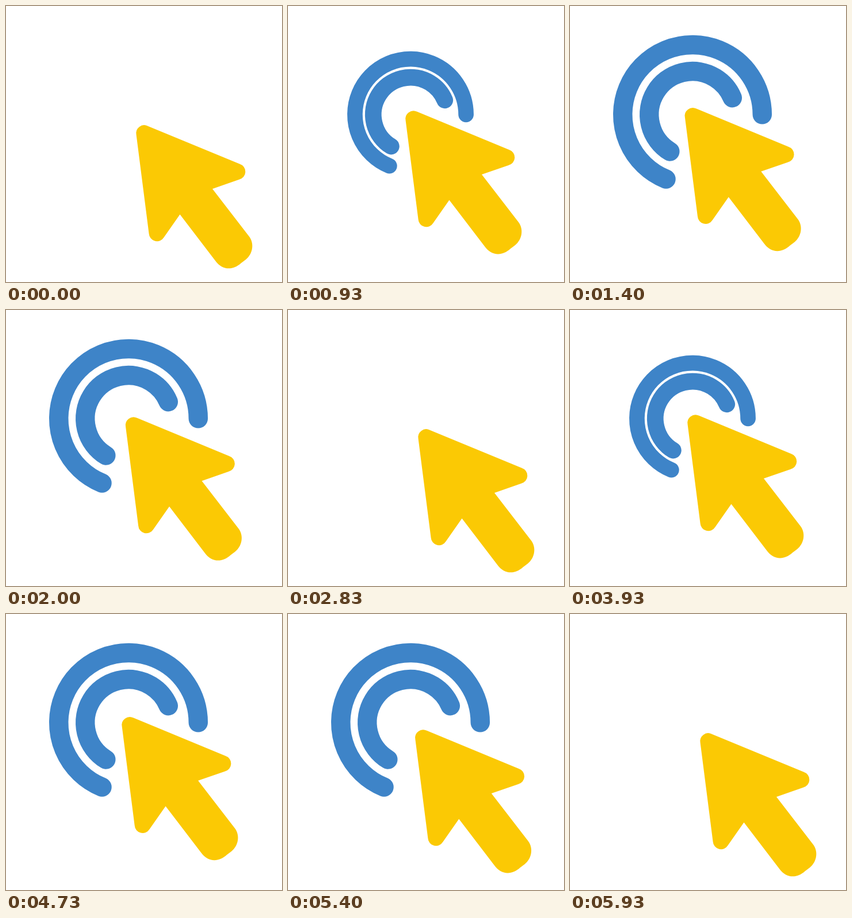
Animation of 480x480 px, one loop 6.01 s. Source, as an HTML page with a canvas:

```html
<!DOCTYPE html>
<html lang="en">
<head>
<meta charset="utf-8">
<title>Click</title>
<style>
  html, body { margin: 0; width: 100%; height: 100%; overflow: hidden; background: #fff; }
  canvas { display: block; }
</style>
</head>
<body>
<canvas width="480" height="480"></canvas>
<script>
const ctx = document.querySelector('canvas').getContext('2d');
const LOOP = 6010, CYCLE = 60, LAST = 119;
const BLUE = '#3e84c8', YELLOW = '#fbc904';

const arrow = new Path2D(
  'M226.6 224A14 14 0 0 1 246.5 208.7L406.5 274.8A14 14 0 0 1 405.5 301.8L359 318' +
  'L423 401C432 413 429.5 431 417 441L409 447C394 461 375 459 364 443' +
  'L302.5 362.5L274.5 402.5A14 14 0 0 1 248.6 396Z');

// angles in degrees, times in steps of the cycle
const rings = [
  { radius: 121.3, from: 112.3, to: 360, start: 12.7, grow: 15.3 },
  { radius: 75.2, from: 121.4, to: 337.2, start: 12.5, grow: 13.5 }
];

const progress = (t, start, length) => Math.min(1, Math.max(0, (t - start) / length));
const sine = u => (1 - Math.cos(Math.PI * u)) / 2;
const rad = deg => deg * Math.PI / 180;

// steps alternate between 30 ms and 70 ms
function stepAt(ms) {
  const step = 2 * Math.floor(ms / 100) + (ms % 100 >= 30 ? 1 : 0);
  return Math.min(LAST, step) % CYCLE;
}

function drawRing({ radius, from, to, start, grow }, t) {
  const shown = 1 - (1 - progress(t, start, grow)) ** 3;
  const scale = shown * (1 - progress(t, 48.3, 8.3) ** 3);
  if (scale <= 0) return;
  ctx.beginPath();
  ctx.arc(213, 188.8, radius * scale, rad(from), rad(to));
  ctx.lineWidth = 33.5 * scale;
  ctx.stroke();
}

function draw(now) {
  const t = stepAt(now % LOOP);
  ctx.clearRect(0, 0, 480, 480);
  ctx.strokeStyle = BLUE;
  ctx.lineCap = 'round';
  rings.forEach(ring => drawRing(ring, t));

  const push = 26.7 * (sine(progress(t, 0.5, 25.5)) - sine(progress(t, 31, 24)));
  ctx.save();
  ctx.translate(-push, -1.13 * push);
  ctx.fillStyle = YELLOW;
  ctx.fill(arrow);
  ctx.restore();
}

const begin = performance.now();
function tick() {
  draw(performance.now() - begin);
  requestAnimationFrame(tick);
}
tick();
</script>
</body>
</html>
```
